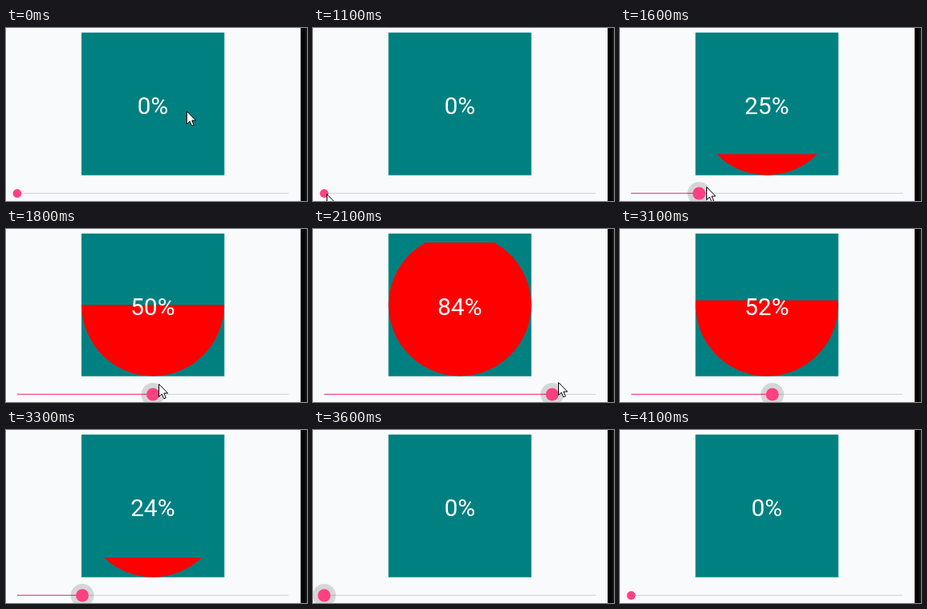
Animation of 377 by 217 pixels, one loop 4.6 s. Source, as an HTML page:

```html
<!DOCTYPE html>
<html lang="en">
<head>
<meta charset="utf-8">
<style>
  html, body { margin: 0; height: 100%; overflow: hidden; background: #f9fafc; }
  svg { display: block; }
  text { font: 30px Roboto, sans-serif; fill: #fff; text-anchor: middle; }
</style>
</head>
<body>
<svg width="377" height="217" viewBox="0 0 377 217">
  <defs>
    <linearGradient id="edge">
      <stop offset="0" stop-color="#000"/>
      <stop offset=".6" stop-color="#050505"/>
      <stop offset="1" stop-color="#1c1c1c"/>
    </linearGradient>
  </defs>
  <rect x="369" width="8" height="217" fill="url(#edge)"/>
  <rect x="94.5" y="5.7" width="179" height="179" fill="#008080"/>
  <path id="fill" fill="#f00"/>
  <text id="label" x="183.8" y="107.5"></text>
  <path d="M14 207.4H354" stroke="#d5d7da" stroke-width="1.4"/>
  <path id="track" stroke="#f4508a" stroke-width="1.4"/>
  <circle id="halo" cy="207.5" fill-opacity=".14"/>
  <circle id="thumb" cy="207.5" fill="#ff4081"/>
  <path id="cursor" d="M.5 .5V16.5L4.2 13L6.8 18.8L9.3 17.7L6.8 12H11.7Z" fill="#fff" stroke="#000"/>
</svg>
<script>
const $ = id => document.getElementById(id);
const LOOP = 4600, STEP = 100, CX = 184, CY = 95.2, R = 89.3;

function set(id, attrs) {
  for (const name in attrs) $(id).setAttribute(name, attrs[name]);
}

// Chord-cut disc whose half angle grows with the percentage
function segment(percent) {
  if (!percent) return "";
  const angle = Math.min(percent, 99.99) / 100 * Math.PI;
  const dx = R * Math.sin(angle), y = CY + R * Math.cos(angle);
  return `M${CX + dx} ${y}A${R} ${R} 0 ${percent > 50 ? 1 : 0} 1 ${CX - dx} ${y}Z`;
}

function draw() {
  const step = Math.floor(performance.now() % LOOP / STEP);
  const ramp = (from, to) => Math.min(1, Math.max(0, (step - from) / (to - from)));
  const ease = (from, to) => {
    const u = ramp(from, to);
    return u * u * (3 - 2 * u);
  };

  const percent = Math.floor(100 * (ease(12, 24) - ease(25.9, 36.4)) + 0.05);
  const press = ramp(11, 13) - ramp(39, 41);
  const x = 14 + percent * 3.4;

  // Approach, settle on the thumb, drag right, leave at the bottom
  const approach = ease(0, 2), settle = ease(3, 8);
  const mx = 226 - 176 * approach - 33 * settle + 343 * (ease(11.9, 24) - ease(26, 33.3));
  const my = 104 + 57 * approach + 47 * settle - 16 * ease(11, 20) + 38 * ease(26, 30);

  $("label").textContent = percent + "%";
  set("fill", { d: segment(percent) });
  set("track", { d: `M14 207.4H${x}` });
  set("halo", { cx: x, r: 14.5 * press });
  set("thumb", { cx: x, r: 5.4 + 2.6 * press });
  set("cursor", { transform: `translate(${Math.round(mx)} ${Math.round(my)})` });
  requestAnimationFrame(draw);
}
draw();
</script>
</body>
</html>
```
